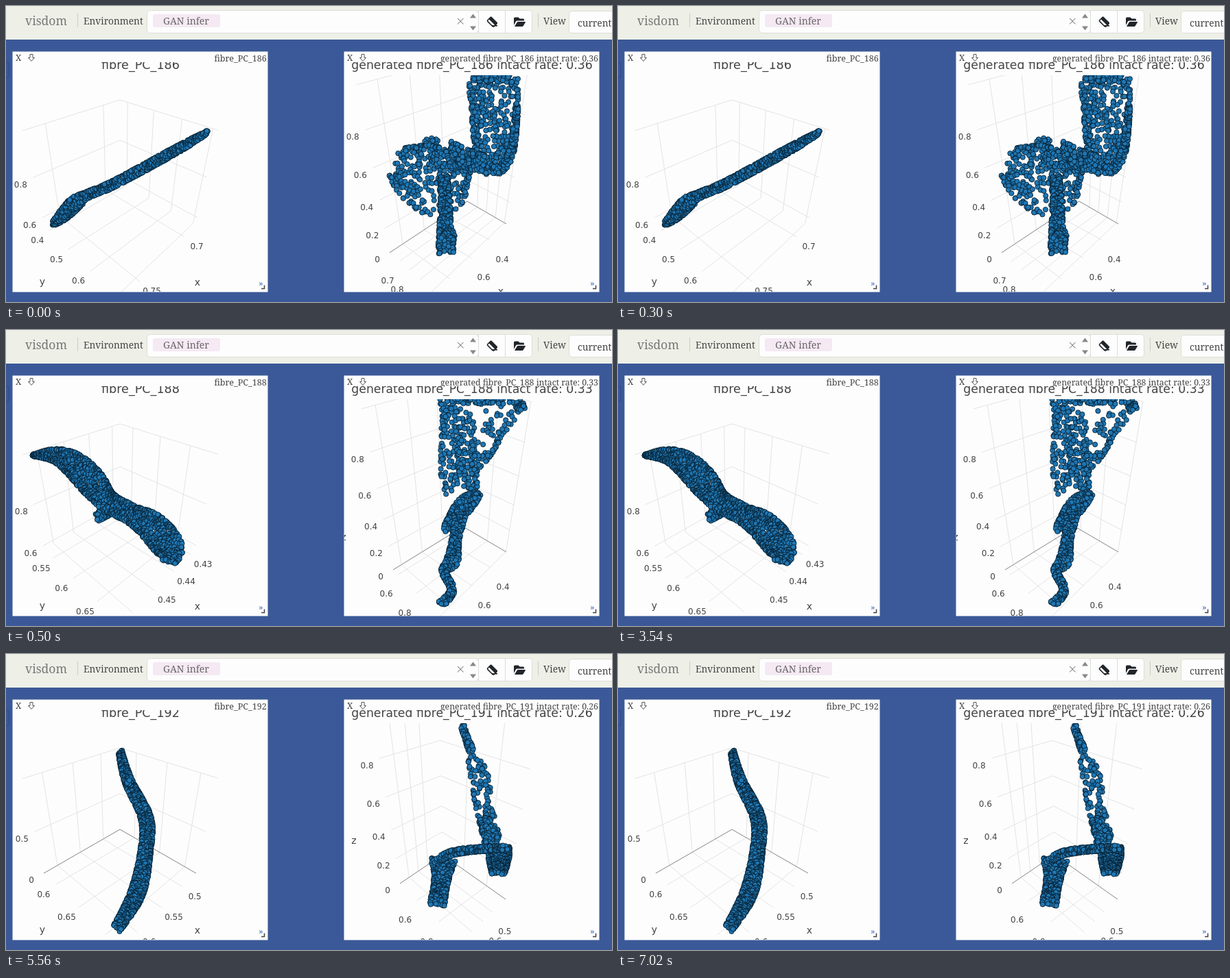
An HTML page with a canvas for the animation above (8000 ms loop, 883 px wide and 432 px high).

```html
<!DOCTYPE html>
<html lang="en">
<head>
<meta charset="utf-8">
<title>Point cloud dashboard</title>
<style>
  html, body { margin: 0; width: 100%; height: 100%; overflow: hidden; background: #3b5998; }
  svg, canvas { position: absolute; left: 0; top: 0; width: 883px; height: 432px; }
  .serif { font-family: "Noto Serif", serif; }
  .sans { font-family: "DejaVu Sans", sans-serif; fill: #444; }
</style>
</head>
<body>
<svg viewBox="0 0 883 432">
  <rect width="883" height="432" fill="#3b5998"/>
  <rect width="883" height="49" fill="#eef0e8"/>
  <rect x="-6" y="82" width="10" height="23" rx="3" fill="#3b5998" stroke="#304a85"/>
  <g fill="#fdfdfd">
    <rect x="9.5" y="66.5" width="372" height="351"/>
    <rect x="492.5" y="66.5" width="372" height="351"/>
    <g stroke="#dcded8">
      <rect x="205.5" y="6.5" width="483" height="33" rx="5"/>
      <rect x="688.5" y="6.5" width="39" height="33"/>
      <path d="M727.5 6.5h34q5 0 5 5v23q0 5-5 5h-34z"/>
      <rect x="820.5" y="7.5" width="80" height="32" rx="4"/>
    </g>
  </g>
  <rect x="214" y="12" width="98" height="19" rx="3" fill="#f5e9f3"/>
  <path d="M104.5 11v20M775.5 11v20" stroke="#c9cbc5"/>
  <path d="M658 18l8.5 8.5m0-8.5l-8.500 8.500" stroke="#666" fill="none"/>
  <path d="M676 17.5l4.5-6 4.5 6zM676 29.5l4.5 6 4.5-6z" fill="#888"/>
  <g fill="#212529">
    <g transform="rotate(45 708 23)">
      <rect x="702" y="19" width="13" height="8" rx="1.5" fill="none" stroke="#212529" stroke-width="1.6"/>
      <rect x="702" y="18.5" width="13" height="5"/>
    </g>
    <path d="M708 28h8v1.600h-8z"/>
    <path d="M740 28v-10q0-1.5 1.5-1.5h5l2 2h5q1.5 0 1.5 1.5v1.5h-10q-1.5 0-2.2 1.2z"/>
    <path d="M741 30l3.5-6q.6-1 1.8-1h11l-3.5 6q-.6 1-1.8 1z"/>
  </g>
  <g class="serif" fill="#444">
    <text x="28" y="28" font-size="17.5" fill="#777">visdom</text>
    <text x="113" y="27" font-size="13.7">Environment</text>
    <text x="229" y="27" font-size="14" fill="#666">GAN infer</text>
    <text x="783" y="27" font-size="13.8">View</text>
    <text x="833" y="30" font-size="13.7">current</text>
  </g>
</svg>
<canvas id="plot" width="883" height="432"></canvas>
<svg viewBox="0 0 883 432">
  <defs>
    <clipPath id="body"><path d="M10 82h371v335h-371zM493 82h371v335h-371z"/></clipPath>
    <clipPath id="bar"><path d="M10 67h371v16h-371zM493 67h371v16h-371z"/></clipPath>
  </defs>
  <g id="labels" class="sans" clip-path="url(#body)" text-anchor="middle" font-size="12"></g>
  <g id="names" class="serif" clip-path="url(#bar)" fill="#444"></g>
  <g id="corners"></g>
</svg>
<script>
const ctx = document.getElementById('plot').getContext('2d');
const byId = id => document.getElementById(id);

// count of dots along a smooth spine of key points [x, y, half width]
const tube = (count, ...spine) => ({ count, spine });
// first value, value step, first position along the edge, position step
const axis = (value, step, at, gap) => ({ value, step, at, gap });
const heights = axis(.8, -.2, .2, .2);

// Corners: upper left, back, right, then lower left, back, right, front
const leftBox = [[24,182], [166,137], [308,181], [55,320], [166,256], [277,320], [166,430]];

const scenes = [
  {
    end: 500, title: 'fibre_PC_186', made: 'generated fibre_PC_186 intact rate: 0.36',
    left: {
      box: leftBox, x: axis(.7, .05, .19, .6), y: axis(.4, .1, .09, .29), z: axis(.8, -.2, .4, .49),
      clouds: [
        tube(200, [67,320,2], [88,306,4], [113,284,3]),
        tube(850, [67,319,2], [97,289,8], [118,276,5], [160,258,5], [250,209,5], [295,183,2])
      ]
    },
    right: {
      box: [[510,115], [672,72], [765,100], [559,360], [672,285], [729,318], [625,420]],
      x: axis(.4, .2, .28, .275), y: axis(.7, .1, .26, .23), z: heights, floor: true,
      clouds: [
        tube(320, [709,104,37], [712,150,34], [711,200,30], [708,236,20]),
        tube(60, [672,106,5], [743,106,5]),
        tube(300, [645,236,9], [685,228,10], [712,241,7], [736,215,4], [745,140,2]),
        tube(360, [565,228,22], [600,243,46], [630,248,57], [668,222,16]),
        tube(150, [640,215,20], [668,222,14], [700,232,12]),
        tube(330, [637,245,6], [640,285,7], [640,325,9], [641,364,12]),
        tube(60, [650,325,5], [640,350,12])
      ]
    }
  },
  {
    end: 5560, title: 'fibre_PC_188', made: 'generated fibre_PC_188 intact rate: 0.33',
    left: {
      box: leftBox, x: axis(.43, .01, .09, .26), y: axis(.55, .05, .15, .3), z: axis(.8, -.2, .43, .52),
      clouds: [
        tube(60, [150,262,8], [130,276,5]),
        tube(1500, [38,183,1], [72,183,10], [100,197,17], [125,222,19], [148,250,14], [185,270,14], [212,287,20], [238,318,20], [237,341,8])
      ]
    },
    right: {
      box: [[518,115], [666,75], [766,105], [564,350], [666,287], [729,324], [633,419]],
      x: axis(.4, .2, .29, .295), y: axis(.6, .2, .13, .43), z: heights, floor: true,
      clouds: [
        tube(240, [690,102,66], [683,130,50], [672,165,40], [660,200,28], [664,240,24]),
        tube(80, [668,115,14], [672,230,12]),
        tube(60, [640,104,3], [757,104,4]),
        tube(30, [746,106,8], [754,118,3]),
        tube(230, [691,237,3], [668,256,12], [637,294,3]),
        tube(400, [662,270,8], [655,305,6], [650,337,9], [638,352,4], [650,380,4], [632,402,5])
      ]
    }
  },
  {
    end: 8000, title: 'fibre_PC_192', made: 'generated fibre_PC_191 intact rate: 0.26',
    left: {
      box: leftBox, x: axis(.5, .05, .22, .3), y: axis(.6, .05, .19, .33), z: axis(.5, -.5, .465, .535), floor: true,
      clouds: [
        tube(1150, [166,141,3], [178,185,6], [204,240,8], [203,290,8], [190,350,10], [160,403,6]),
        tube(20, [172,188,2], [181,187,3])
      ]
    },
    right: {
      box: [[533,85], [631,65], [777,98], [574,335], [636,293], [728,358], [662,423]],
      x: axis(.5, .1, .346, .22), y: axis(.6, .2, .336, .36), z: heights, floor: true,
      clouds: [
        tube(75, [664,101,3], [670,120,3], [680,145,5]),
        tube(110, [677,140,6], [690,180,13], [696,220,12], [710,280,12]),
        tube(90, [697,235,8], [710,280,10]),
        tube(360, [719,280,15], [718,300,15], [717,322,9]),
        tube(300, [638,298,18], [634,330,11], [628,368,11]),
        tube(280, [620,307,3], [655,289,4], [733,282,3])
      ]
    }
  }
];

function seeded(seed) {
  return () => {
    seed = (seed + 0x6D2B79F5) | 0;
    let t = Math.imul(seed ^ seed >>> 15, 1 | seed);
    t = t + Math.imul(t ^ t >>> 7, 61 | t) ^ t;
    return ((t ^ t >>> 14) >>> 0) / 4294967296;
  };
}
const mix = (a, b, t) => a.map((v, i) => v + (b[i] - v) * t);
const shift = (p, dx, dy) => [p[0] + dx, p[1] + dy];

// Perspective: positive depth squeezes the start of an edge, negative its end
const along = (a, b, u, depth = 0) => mix(a, b, u / (1 + depth * (1 - u)));

function steps({ value, step, at, gap }) {
  const list = [];
  for (let k = 0, u = at; u < 1.001; u = at + ++k * gap)
    list.push({ u, name: String(+(value + k * step).toFixed(2)) });
  return list;
}

function line(color, ...points) {
  ctx.strokeStyle = color;
  ctx.beginPath();
  points.forEach(p => ctx.lineTo(...p));
  ctx.stroke();
}

function drawGrid({ box, x, y, z, floor }) {
  const [ul, ub, ur, ll, lb, lr, front] = box, pale = '#e3e3e3';
  const wall = (axis, top, base, opposite) => steps(axis).forEach(({ u }) =>
    line(pale, along(ub, top, u, .15), along(lb, base, u), along(opposite, front, u, .3)));
  ctx.lineWidth = 1;
  wall(x, ul, ll, lr);
  wall(y, ur, lr, ll);
  for (const { u } of [{ u: 0 }, ...steps(z)])
    line(pale, ...[[ul, ll], [ub, lb], [ur, lr]].map(([a, b]) => along(a, b, u, -.32)));
  if (floor) line('#8c8c8c', ll, lb, lr);
}

// Catmull-Rom curve through the spine, s from 0 to 1
function curve(spine, s) {
  const i = Math.min(Math.floor(s * (spine.length - 1)), spine.length - 2);
  const t = s * (spine.length - 1) - i;
  const [b, c] = [spine[i], spine[i + 1]];
  const a = spine[i - 1] || b, d = spine[i + 2] || c;
  return b.map((v, k) => v + t / 2 * (c[k] - a[k] +
    t * (2 * a[k] - 5 * v + 4 * c[k] - d[k] + t * (3 * (v - c[k]) + d[k] - a[k]))));
}

function tubeDots({ count, spine }, rand) {
  const samples = Array.from({ length: 61 }, (_, i) => curve(spine, i / 60));
  const run = [0];
  for (let i = 0; i < 60; i++)
    run.push(run[i] + Math.hypot(samples[i + 1][0] - samples[i][0], samples[i + 1][1] - samples[i][1]));
  return Array.from({ length: count }, (_, k) => {
    const d = (k + rand() * 25) / (count + 25) * run[60];
    const i = Math.min(59, run.findIndex(r => r > d) - 1);
    const a = samples[i], b = samples[i + 1], length = run[i + 1] - run[i];
    const [x, y, width] = mix(a, b, (d - run[i]) / length);
    const off = Math.sin((rand() - .5) * Math.PI) * width / length;
    return [x - (b[1] - a[1]) * off, y + (b[0] - a[0]) * off];
  });
}

function drawPlot(plot, x, seed) {
  const rand = seeded(seed);
  ctx.save();
  ctx.beginPath();
  ctx.rect(x, 101, 371, 316);
  ctx.clip();
  drawGrid(plot);
  ctx.fillStyle = '#1f77b4';
  ctx.strokeStyle = '#071a28';
  ctx.lineWidth = .85;
  for (const [px, py] of plot.clouds.flatMap(c => tubeDots(c, rand))) {
    ctx.beginPath();
    ctx.arc(px, py, 3.6, 0, 7);
    ctx.fill();
    ctx.stroke();
  }
  ctx.restore();
}

const text = (s, x, y, size, more = '') => `<text x="${x}" y="${y}" font-size="${size}" ${more}>${s}</text>`;
const centred = (s, [x, y], size) => text(s, x, y + size * .365, size);

function tickLabels({ box, x, y, z }, drop) {
  const [ul, , , ll, , lr, front] = box;
  const edge = (axis, from, to, depth, dx, dy) => steps(axis).map(({ u, name }) =>
    centred(name, shift(along(from, to, u, depth), dx, dy), 12)).join('');
  return edge(x, lr, front, .3, 18, drop) + edge(y, ll, front, .3, -17, drop) + edge(z, ul, ll, -.32, -18, 10);
}

function show({ title, made, left, right }, index) {
  ctx.clearRect(0, 0, 883, 432);
  drawPlot(left, 10, 11 + index);
  drawPlot(right, 493, 71 + index);
  byId('labels').innerHTML =
    text(title, 196, 91.5, 17.6) + text(made, 679, 91.5, 17.25) +
    tickLabels(left, 14) + tickLabels(right, 28) +
    centred('y', [53, 402], 14) + centred('x', [279, 403], 14) +
    centred('x', shift(right.box[5], -8, 98), 14) + centred('z', shift(right.box[0], -26, 187), 14);
  byId('names').innerHTML = [0, 483].map(dx =>
    text('X', 14 + dx, 80, 12.5) +
    `<path d="M${35 + dx} 70.5h4v5h2.5l-4.5 5-4.5-5h2.5z" fill="none" stroke="#555"/>`).join('') +
    text(title, 303.5, 81, 12.5) + text(made, 633, 81, 12.27);
}

byId('corners').innerHTML = [0, 483].map(dx =>
  text('»', 368 + dx, 409, 13, 'class="serif" fill="#4a6fc4"') +
  `<path d="M${372 + dx} 412.5h4.5v-5" fill="none" stroke="#444" stroke-width="1.5"/>`).join('');

let shown = -1;
const start = performance.now();
function frame() {
  const time = (performance.now() - start) % 8000;
  const index = scenes.findIndex(s => time < s.end);
  if (index !== shown) show(scenes[shown = index], index);
  requestAnimationFrame(frame);
}
frame();
</script>
</body>
</html>
```
